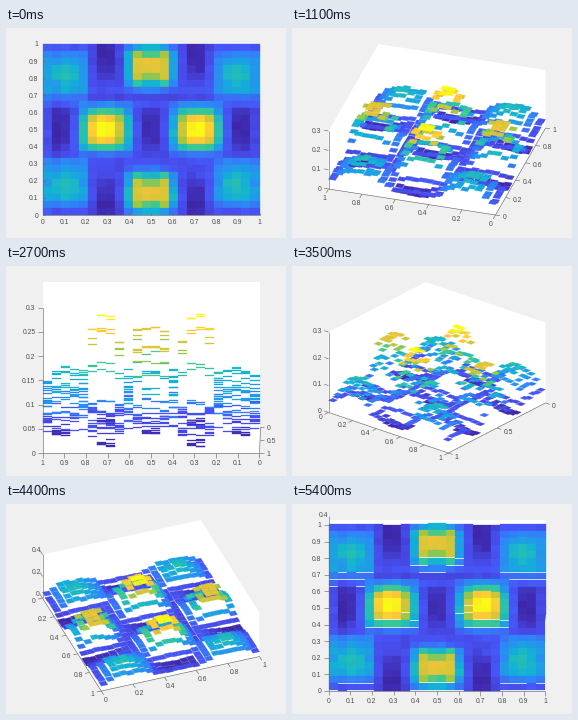
Recreate the animation shown at these times as a matplotlib script. Size 280x210 px, loop 5500 ms.

```python
import numpy as np
import matplotlib.pyplot as plt
from matplotlib.animation import FuncAnimation
from matplotlib.collections import PolyCollection
from matplotlib.colors import LinearSegmentedColormap

W, H, DPI = 280, 210, 100
PT = 72 / DPI                                    # points per pixel
FRAMES, STEP_MS = 55, 100
LEFT, RIGHT, TOP, BOTTOM = 36.5, 253.5, 16, 187  # rectangle filled by the box
CELLS = 24
INK, LINE = "#505050", "#666666"
TICK, GAP = 4.5, 2.5

PARULA = LinearSegmentedColormap.from_list("parula", [
    (.2422, .1504, .6603), (.2810, .3228, .9579), (.1786, .5289, .9682),
    (.0689, .6948, .8394), (.2161, .7843, .5923), (.6720, .7793, .2227),
    (.9970, .7659, .2199), (.9769, .9839, .0805)])

# Camera path: linear between these stops
STOPS = [0, 27, 40.5, 54]
AZIMUTH = [0, -180, -266, -360]
ELEVATION = [90, 10, 58.5, 88.3]


def make_heights():
    mid = (np.arange(CELLS) + .5) / CELLS
    x, y = np.meshgrid(mid, mid)
    u, v = abs(x - .5), abs(y - .5)

    def bump(cu, cv, su, sv, p=2):
        return np.exp(-abs((u - cu) / su) ** p - abs((v - cv) / sv) ** p)

    z = np.full(x.shape, .043)
    # Each peak is a steep plateau with a rounder core
    z += .075 * bump(.21, 0, .125, .145, 6) + .14 * bump(.217, 0, .09, .1, 3)
    z += .05 * bump(.4, .31, .112, .145, 6) + .042 * bump(.395, .32, .08, .09)
    z += .185 * bump(0, .365, .105, .115, 4)
    dip = np.minimum(1, abs(v - .375) / .06)
    z -= .045 * dip * (u < .04) * (v > .25) * (v < .46)
    for cu, cv in [(0, 0), (.207, .43), (.42, 0)]:
        z -= .032 * bump(cu, cv, .05, .13, 3)
    rng = np.random.default_rng(4)
    z *= 1 + rng.normal(0, .06, (CELLS, 1)) * (z < .12)
    z *= 1 + rng.normal(0, .06, (1, CELLS)) * (z < .12)
    z += rng.normal(0, .002, z.shape)
    return x.ravel(), y.ravel(), np.clip(z, .01, .258).ravel()


CX, CY, CZ = make_heights()
COLORS = PARULA((CZ - CZ.min()) / (CZ.max() - CZ.min()))
HALF = .5 / CELLS
TILES = np.stack([np.stack([CX + a * HALF, CY + b * HALF, CZ], -1)
                  for a, b in [(-1, -1), (1, -1), (1, 1), (-1, 1)]], 1)
CUBE = np.array([(a, b, c) for a in (0, 1) for b in (0, 1) for c in (0, 1)], float)


def make_view(az, el):
    """Orthographic projection of the unit cube, stretched to the rectangle."""
    a, e = np.radians([az, el])
    right = np.array([np.cos(a), np.sin(a), 0])
    up = np.array([-np.sin(a) * np.sin(e), np.cos(a) * np.sin(e), np.cos(e)])
    cu, cv = CUBE @ right, CUBE @ up
    sx = (RIGHT - LEFT) / np.ptp(cu)
    sy = (BOTTOM - TOP) / np.ptp(cv)

    def project(p):
        p = np.asarray(p, float)
        return np.stack([LEFT + (p @ right - cu.min()) * sx,
                         BOTTOM - (p @ up - cv.min()) * sy], -1)
    return project


def tick_step(vec):
    for step in (.1, .2):
        if abs(vec[0]) * step >= 20 or abs(vec[1]) * step >= 16:
            return step
    return .5


def z_scale(length):
    """Upper limit and tick values for the height axis."""
    if length / 6 >= 16:
        return .3, np.arange(7) * .05
    if length / 3 >= 16:
        return .3, np.arange(4) * .1
    if length >= 20:
        return .4, np.arange(3) * .2
    if length >= 12:
        return .4, np.array([0, .4])
    return .4, np.array([.4])


def line(p, q):
    ax.plot([p[0], q[0]], [p[1], q[1]], color=LINE, lw=.6 * PT,
            solid_capstyle="butt", zorder=3)


def draw_axis(project, start, end, values, limit, out, flat, is_z=False):
    start, end, out = (np.array(v, float) for v in (start, end, out))
    line(project(start), project(end))
    for value in values:
        spot = start + (end - start) * value / limit
        p = project(spot)
        arm = project(spot + out) - p
        unit = arm / max(np.hypot(*arm), 1e-9)
        if flat:
            line(p, p - unit * 2.2)
            reach = 4
        else:
            line(p, p + unit * TICK)
            reach = TICK + GAP
        label = f"{round(value, 2):g}"
        half_w = (len(label) * 3.8 - (1.9 if "." in label else 0)) / 2
        shift = unit * (reach + np.array([half_w, 3 if flat else 2.5]))
        if is_z:
            shift = np.array([min(shift[0], -5), shift[1] * .6])
        ax.text(*(p + shift), label, size=6.9 * PT, color=INK,
                family="Liberation Sans", ha="center", va="center_baseline", zorder=4)


def hull(points):
    pts = sorted(map(tuple, np.round(points, 6)))

    def chain(seq):
        out = []
        for p in seq:
            while len(out) > 1 and ((out[-1][0] - out[-2][0]) * (p[1] - out[-2][1])
                                    <= (out[-1][1] - out[-2][1]) * (p[0] - out[-2][0])):
                out.pop()
            out.append(p)
        return out[:-1]
    return chain(pts) + chain(pts[::-1])


def draw(k):
    ax.clear()
    ax.set(xlim=(0, W), ylim=(H, 0))
    ax.axis("off")
    az = np.interp(k, STOPS, AZIMUTH)
    el = np.interp(k, STOPS, ELEVATION)
    flat = el > 89.9
    project = make_view(az, el)
    s, c = np.sin(np.radians(az)), np.cos(np.radians(az))

    ax.add_patch(plt.Polygon(hull(project(CUBE)), fc="white", ec="none", zorder=0))

    z_len = abs(project((0, 0, 0))[1] - project((0, 0, 1))[1])
    z_max, z_ticks = z_scale(z_len)
    order = np.argsort(CX * s - CY * c, kind="stable")
    quads = project(TILES[order] / (1, 1, z_max))
    ax.add_collection(PolyCollection(quads, facecolors=COLORS[order],
                                     edgecolors=COLORS[order],
                                     linewidths=.3 * PT, zorder=2))

    # Axes run along the two floor edges that meet at the nearest corner
    nx, ny = int(s > 1e-6), int(c < 0)
    out_x, out_y = (2 * nx - 1, 0, 0), (0, 2 * ny - 1, 0)
    for start, end, out in [((0, ny, 0), (1, ny, 0), out_y),
                            ((nx, 0, 0), (nx, 1, 0), out_x)]:
        step = tick_step(project(end) - project(start))
        draw_axis(project, start, end, np.arange(0, 1.01, step), 1, out, flat)
    if not flat:
        ends = [((1 - nx, ny), (1 - 2 * nx, 0, 0)),
                ((nx, 1 - ny), (0, 1 - 2 * ny, 0))]
        (x, y), out = min(ends, key=lambda e: project((*e[0], 0))[0])
        draw_axis(project, (x, y, 0), (x, y, 1), z_ticks, z_max, out, flat, True)
    return []


fig = plt.figure(figsize=(W / DPI, H / DPI), dpi=DPI, facecolor="#f0f0f0")
ax = fig.add_axes([0, 0, 1, 1])
anim = FuncAnimation(fig, draw, frames=FRAMES, interval=STEP_MS,
                     init_func=lambda: [], repeat=True, repeat_delay=0)
plt.show()
```
